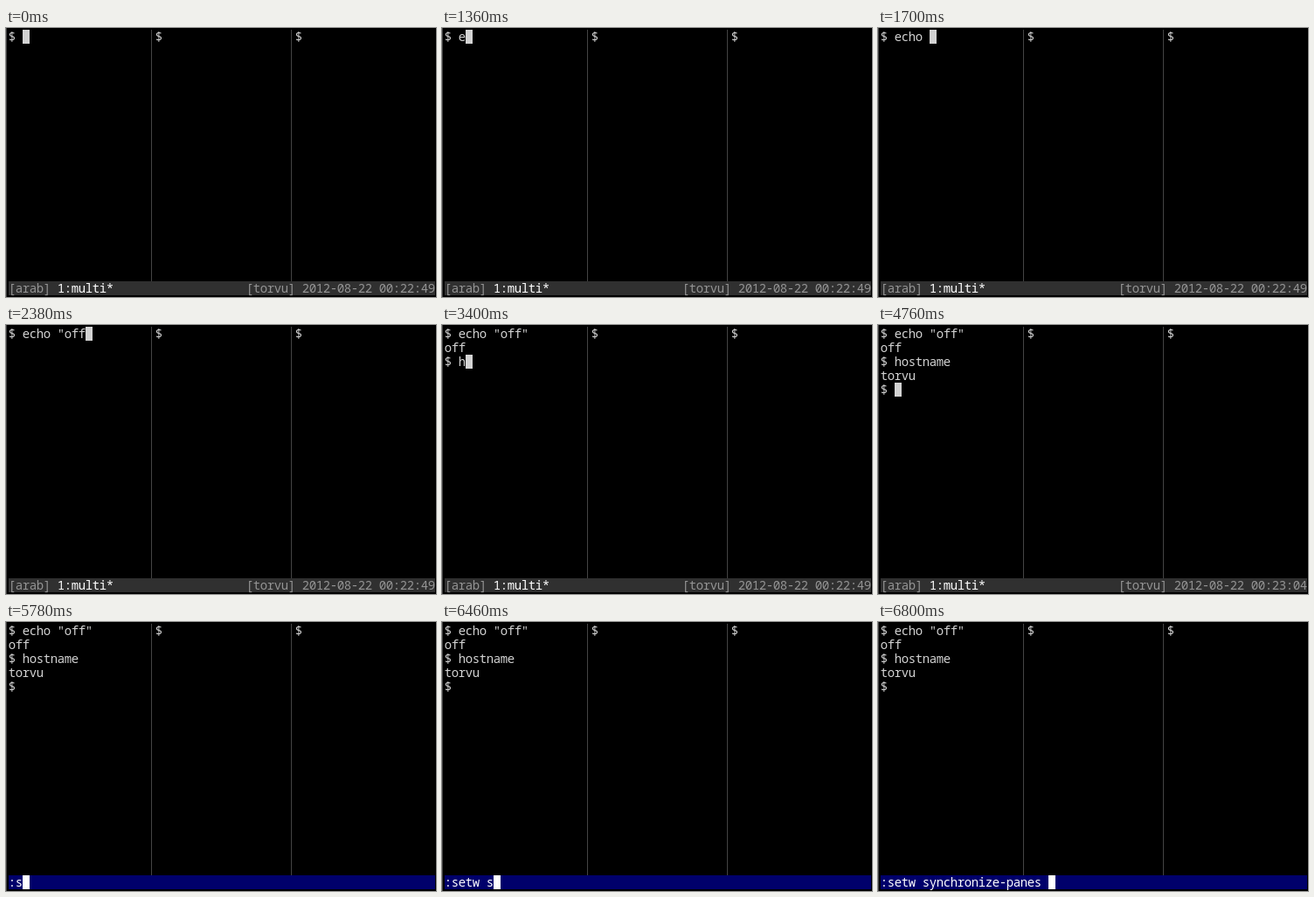
Animation of 492 by 308 pixels, one loop 8000 ms. Source, as an HTML page with a canvas:

```html
<!DOCTYPE html>
<html lang="en">
<head>
<meta charset="utf-8">
<title>Terminal panes</title>
<style>
html, body { margin: 0; width: 100%; height: 100%; overflow: hidden; background: #000; }
canvas { display: block; }
</style>
</head>
<body>
<canvas id="stage" width="492" height="308"></canvas>
<script>
const ctx = document.getElementById('stage').getContext('2d');
const LOOP = 8000, CELL_W = 8, CELL_H = 16, LEFT = 3, TOP = 2;
const COLS = 61, STATUS_ROW = 18;
const HOST = 'torvu';
const TEXT = '#d3d3d3', RULE = '#444', BAR = '#303030', DIM = '#949494', WHITE = '#fff', PROMPT = '#00006b';

const firstCommand = '$ echo "off"';
const history = [firstCommand, 'off'];
const secondCommand = '$ hostname';

// Each entry: start time, lines of the left pane.
const shell = [
  [0, ['$ ']],
  [1360, ['$ e']],
  [1700, ['$ echo ']],
  [2040, ['$ echo "']],
  [2380, ['$ echo "off']],
  [2720, [...history, '$ ']],
  [3400, [...history, '$ h']],
  [3740, [...history, '$ hostnam']],
  [4080, [...history, secondCommand, HOST, '$ ']]
];
const clock = [[0, '00:22:49'], [4760, '00:23:04']];
const prompt = [
  [0, ''],
  [5780, ':s'],
  [6120, ':set'],
  [6460, ':setw s'],
  [6800, ':setw synchronize-panes ']
];

const at = (steps, time) => steps.filter(([start]) => start <= time).pop()[1];
const cellX = col => LEFT + col * CELL_W;
const cellY = row => TOP + row * CELL_H;

function rect(color, x, y, w, h) {
  ctx.fillStyle = color;
  ctx.fillRect(x, y, w, h);
}

function print(text, col, row, color = TEXT) {
  ctx.fillStyle = color;
  [...text].forEach((char, i) => ctx.fillText(char, cellX(col + i) + CELL_W / 2, cellY(row) + 13));
}

function cursor(col, row, color) {
  rect(color, cellX(col), cellY(row), CELL_W, CELL_H);
}

function drawStatus(time) {
  const right = `[${HOST}] 2012-08-22 ${at(clock, time)}`;
  print('[arab]', 0, STATUS_ROW, DIM);
  print('1:multi*', 7, STATUS_ROW, WHITE);
  print(right, COLS - right.length, STATUS_ROW, DIM);
}

function draw(time) {
  const lines = at(shell, time);
  const command = at(prompt, time);
  rect('#000', 0, 0, 492, 308);
  rect(RULE, 0, 0, 1, 308);
  ctx.font = '14px "Noto Sans Mono", "DejaVu Sans Mono", monospace';
  ctx.textAlign = 'center';

  for (const col of [20, 40]) {
    rect(RULE, cellX(col) + 3, TOP, 1, STATUS_ROW * CELL_H);
    print('$', col + 1, 0);
  }
  lines.forEach((line, row) => print(line, 0, row));

  rect(command ? PROMPT : BAR, LEFT, cellY(STATUS_ROW), COLS * CELL_W, CELL_H);
  if (command) {
    print(command, 0, STATUS_ROW, WHITE);
    cursor(command.length, STATUS_ROW, WHITE);
  } else {
    const row = lines.length - 1;
    cursor(lines[row].length, row, TEXT);
    drawStatus(time);
  }
}

const start = performance.now();
function tick() {
  draw((performance.now() - start) % LOOP);
  requestAnimationFrame(tick);
}
tick();
</script>
</body>
</html>
```
